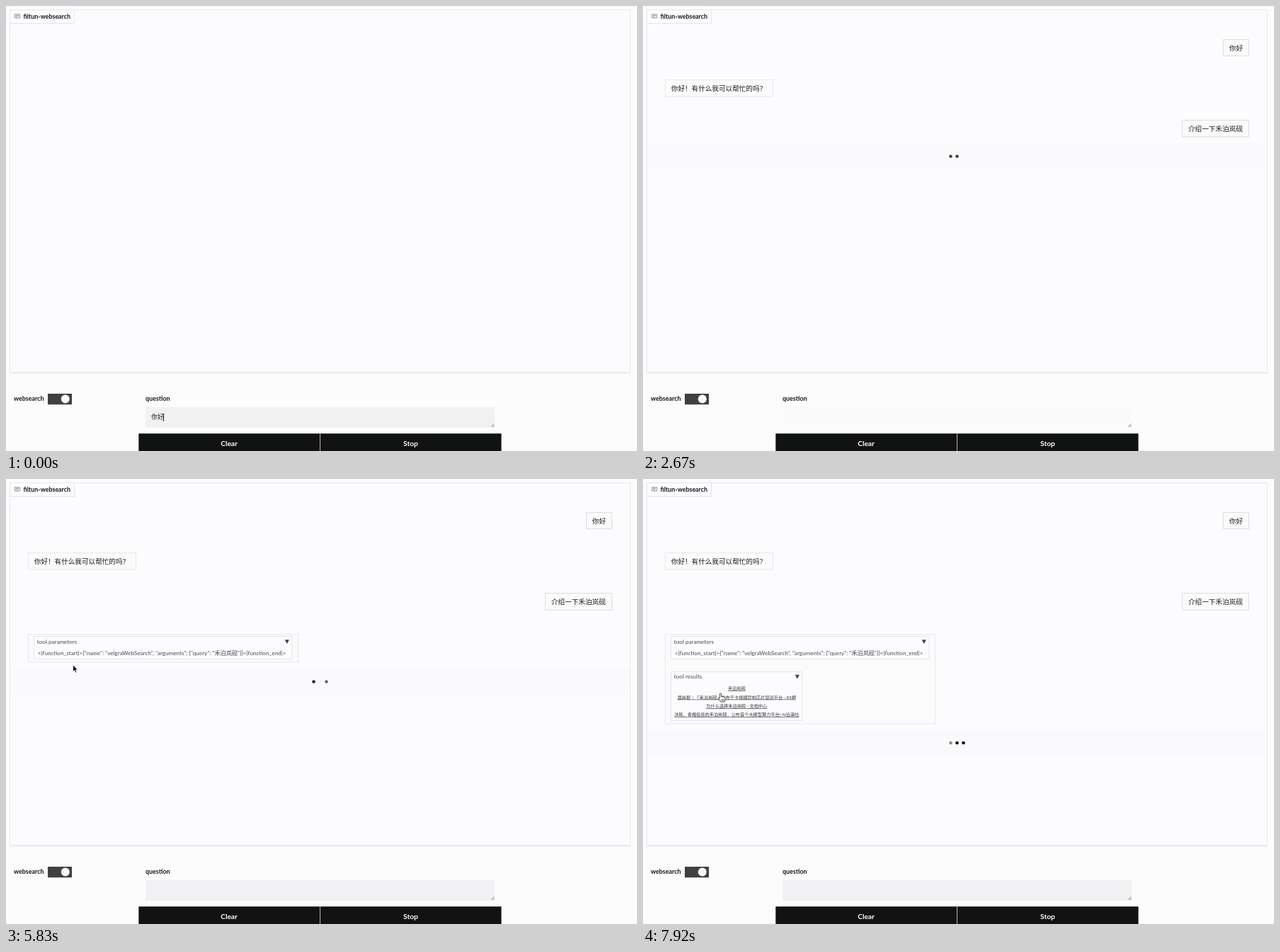
Recreate the animation shown at these times as an HTML page. Size 891x629 px, loop 8 s.

```html
<!DOCTYPE html>
<html lang="zh-CN">
<head>
<meta charset="utf-8">
<title>Chat with web search</title>
<style>
  html, body { margin: 0; width: 100%; height: 100%; overflow: hidden; background: #fcfcfd; }
  svg { display: block; width: 891px; height: 629px; }
  text { font-family: Lato, "Noto Sans CJK SC", "Noto Sans CJK", sans-serif; fill: #18181b; white-space: pre; }
  .label { font-size: 8.9px; font-weight: 700; }
  .button { font-size: 10.2px; font-weight: 700; fill: #fff; text-anchor: middle; }
  .chat { font-size: 9.6px; }
  .input { font-size: 8.6px; }
  .tool { font-size: 8.15px; fill: #484850; }
  .link { font-size: 6.2px; fill: #333338; text-anchor: middle; text-decoration: underline; }
  .bubble { fill: #fbfbfc; stroke: #e7e7ef; }
  .user { stroke: #dcdce4; }
  .fold { fill: #fcfcfe; stroke: #e3e3ee; }
</style>
</head>
<body>
<svg id="stage" viewBox="0 0 891 629">
  <rect width="891" height="629" fill="#fcfcfd"/>
  <rect x="5.5" y="5.5" width="876" height="512.5" fill="#fcfcfe" stroke="#e9e8f7"/>
  <path d="M5 518.5H882" stroke="#e6e5ee"/>
  <path d="M5 519.5H882" stroke="#f5f5f4"/>
  <path d="M5.5 5.5H96.5V24.5H5.5Z" fill="#fdfdff" stroke="#e3e1f6"/>
  <path d="M12.5 11.8H19.7V16.6H17L16 18L15 16.6H12.5ZM14 13.4H18.2M14 15H17" fill="none" stroke="#77777c" stroke-width=".8"/>
  <text class="label" x="24.5" y="17.5">filtun-websearch</text>

  <text class="label" x="11" y="558.4">websearch</text>
  <rect x="59" y="548" width="34" height="15.3" fill="#404040"/>
  <circle cx="83.8" cy="555.6" r="6" fill="#fff"/>

  <text class="label" x="197" y="557.8">question</text>
  <rect id="field" x="197" y="567" width="493" height="29"/>
  <path d="M685 595L689.5 590.5M687.5 595L689.5 593" stroke="#66666a" stroke-width=".8"/>
  <text id="typed" class="input" x="205.3" y="584.3"></text>
  <path id="caret" stroke="#111" stroke-width="1"/>

  <rect x="187.3" y="604.3" width="512.2" height="24.7" fill="#111311"/>
  <path d="M443.5 604.3V629" stroke="#b5b5b5"/>
  <text class="button" x="315" y="621.5">Clear</text>
  <text class="button" x="571.5" y="621.5">Stop</text>

  <g id="pending">
    <rect x="6" y="-18" width="875" height="36" fill="#fafafc"/>
    <circle cx="434.5" r="2.3"/>
    <circle cx="443.5" r="2.3"/>
    <circle cx="452.5" r="2.3"/>
  </g>

  <g id="hello">
    <rect class="bubble user" x="819.5" y="47.5" width="36" height="23"/>
    <text class="chat" x="827.8" y="62.5">你好</text>
  </g>
  <g id="reply">
    <rect class="bubble" x="31.5" y="104.5" width="152" height="23.5"/>
    <text id="replyText" class="chat" x="39.8" y="119.7"></text>
  </g>
  <g id="ask">
    <rect class="bubble user" x="761.5" y="161.5" width="94" height="23.5"/>
    <text class="chat" x="770" y="176.8">介绍一下禾泊岚砚</text>
  </g>

  <g id="tools">
    <rect id="toolBox" class="bubble" x="31.5" y="219.5"/>
    <rect id="paramBox" class="fold" x="39.5" y="222.5"/>
    <text class="tool" x="43.8" y="232.7">tool parameters</text>
    <path id="paramMark" fill="#3c3c42"/>
    <text id="params" class="tool" x="44.8" y="248.8">&lt;|function_start|&gt;{"name": "velgraWebSearch", "arguments": {"query": "禾泊岚砚"}}&lt;|function_end|&gt;</text>
    <g id="results">
      <rect id="resultBox" class="fold" x="39.5" y="272.5"/>
      <text class="tool" x="43.8" y="282.2">tool results</text>
      <path id="resultMark" fill="#3c3c42"/>
      <g id="links"></g>
    </g>
  </g>

  <g id="cursor">
    <path id="arrow" d="M0 0V9.6L2.2 7.6L3.8 11.2L5.4 10.5L3.9 7H6.8Z" fill="#111" stroke="#fff" stroke-width=".7"/>
    <path id="hand" d="M-1.1 6.4V1A1.1 1.1 0 0 1 1.1 1V4.6Q2.7 4 3 5Q4.6 4.5 4.9 5.5Q6.6 5.2 6.6 6.7V9Q6.6 10.4 5.6 12H.2Q-.6 10.2 -2.7 8Q-3.5 6.8 -2.4 6.4Q-1.6 6.4 -1.1 7.2ZM1.4 8.2V10.4M3 8.2V10.4M4.6 8.2V10.4" fill="#fff" stroke="#222" stroke-width=".8"/>
  </g>
</svg>
<script>
const LOOP = 8000;
const REPLY = '你好！有什么我可以帮忙的吗？';
const LINKS = [
  '禾泊岚砚',
  '晨岸报｜「禾泊岚砚」发布千卡规模异构芯片混训平台 - 85岬',
  '为什么选择禾泊岚砚 - 文档中心',
  '沐砾、青槐投资的禾泊岚砚，公布首个大模型算力平台| AI远澜社'
];

// Waiting strips: from, to, centre y, time at which the dots begin to pulse
const WAITS = [
  [750, 1083, 98, 285],
  [2500, 2920, 212.5, 2005],
  [3420, 4250, 269.5, 3450],
  [4250, 6000, 286.5, 3450],
  [6000, 7083, 318.5, 3450],
  [7083, 7667, 360.5, 3450],
  [7667, 8000, 373, 7690]
];
const CARETS = [[0, 500, 222.5], [1500, 1920, 205.8], [1920, 2500, 274], [3170, 3500, 205.8]];
const TYPED = [[0, 750, '你好'], [1920, 2500, '介绍一下禾泊岚砚']];
const DIM = [[750, 917], [2500, 2750]];
// Pointer tip: time, x, y
const PATH = [
  [3420, 165, 150], [3670, 125.5, 197], [4000, 110, 219], [4200, 95.5, 231],
  [5080, 95.5, 231], [5580, 97, 258], [6500, 83.5, 284.5], [7083, 83.5, 284.5],
  [7700, 109.5, 303], [8000, 109.5, 303]
];

const $ = id => document.getElementById(id);
const show = (el, on) => { el.style.display = on ? '' : 'none'; };
const at = (rows, t) => rows.find(r => t >= r[0] && t < r[1]);
const smooth = u => u * u * (3 - 2 * u);
const size = (el, w, h) => { el.setAttribute('width', w); el.setAttribute('height', h); };
const move = (el, x, y) => el.setAttribute('transform', `translate(${x} ${y})`);

const links = LINKS.map((label, i) => {
  const el = document.createElementNS('http://www.w3.org/2000/svg', 'text');
  el.setAttribute('class', 'link');
  el.setAttribute('y', 298.2 + 12.4 * i);
  el.textContent = label;
  $('links').append(el);
  return el;
});
const dots = [...$('pending').querySelectorAll('circle')];

function mark(el, x, y, open) {
  el.setAttribute('d', open
    ? `M${x - 3} ${y - 2.7}H${x + 3}L${x} ${y + 2.9}Z`
    : `M${x + 2.8} ${y - 2.8}V${y + 2.8}L${x - 3} ${y}Z`);
}

function drawInput(t) {
  const text = at(TYPED, t), caret = at(CARETS, t);
  $('typed').textContent = text ? text[2] : '';
  show($('caret'), caret);
  if (caret) $('caret').setAttribute('d', `M${caret[2]} 576V587`);
  $('field').setAttribute('fill', at(DIM, t) ? '#fafafc' : '#f1f1f4');
}

function drawWait(t) {
  const wait = at(WAITS, t);
  show($('pending'), wait);
  if (!wait) return;
  move($('pending'), 0, wait[2]);
  dots.forEach((dot, i) => {
    const age = (t - wait[3]) / 1000 - i * 0.33;
    const u = age % 1;
    dot.setAttribute('opacity', age < 0 ? 1 : smooth(1 - Math.abs(2 * u - 1)));
  });
}

function drawTools(t) {
  const open = t >= 4250, found = t >= 6000, listed = t >= 7083, full = t >= 7667;
  show($('tools'), t >= 3420);
  show($('params'), open);
  show($('results'), found);
  show($('links'), listed);
  show(links[3], full);

  const bottom = full ? 346 : listed ? 333.5 : found ? 291.5 : open ? 258.5 : 241.5;
  size($('toolBox'), open ? 381 : 94.5, bottom - 219.5);
  size($('paramBox'), open ? 364.5 : 78, open ? 32 : 15);
  mark($('paramMark'), open ? 396.8 : 110.3, 230, open);

  const width = full ? 185 : listed ? 176 : 59;
  size($('resultBox'), width, full ? 69 : listed ? 56.5 : 14.5);
  mark($('resultMark'), 39.5 + width - 6.7, 279.5, listed);
  links.forEach(el => el.setAttribute('x', 39.8 + width / 2));
}

function drawCursor(t) {
  const i = PATH.findIndex((p, k) => k && t < p[0]);
  const on = t >= PATH[0][0];
  show($('cursor'), on);
  if (!on) return;
  const [t0, x0, y0] = PATH[i - 1], [t1, x1, y1] = PATH[i];
  const u = smooth((t - t0) / (t1 - t0));
  const x = x0 + (x1 - x0) * u, y = y0 + (y1 - y0) * u;
  const hand = (y > 222 && y < 238) || y > 272;
  move($('cursor'), x, y);
  show($('hand'), hand);
  show($('arrow'), !hand);
}

function draw(t) {
  show($('hello'), t >= 750);
  show($('reply'), t >= 1083);
  $('replyText').textContent = t < 1170 ? REPLY.slice(0, 3) : REPLY;
  show($('ask'), t >= 2500);
  drawInput(t);
  drawWait(t);
  drawTools(t);
  drawCursor(t);
}

function tick() {
  draw(performance.now() % LOOP);
  requestAnimationFrame(tick);
}
tick();
</script>
</body>
</html>
```
